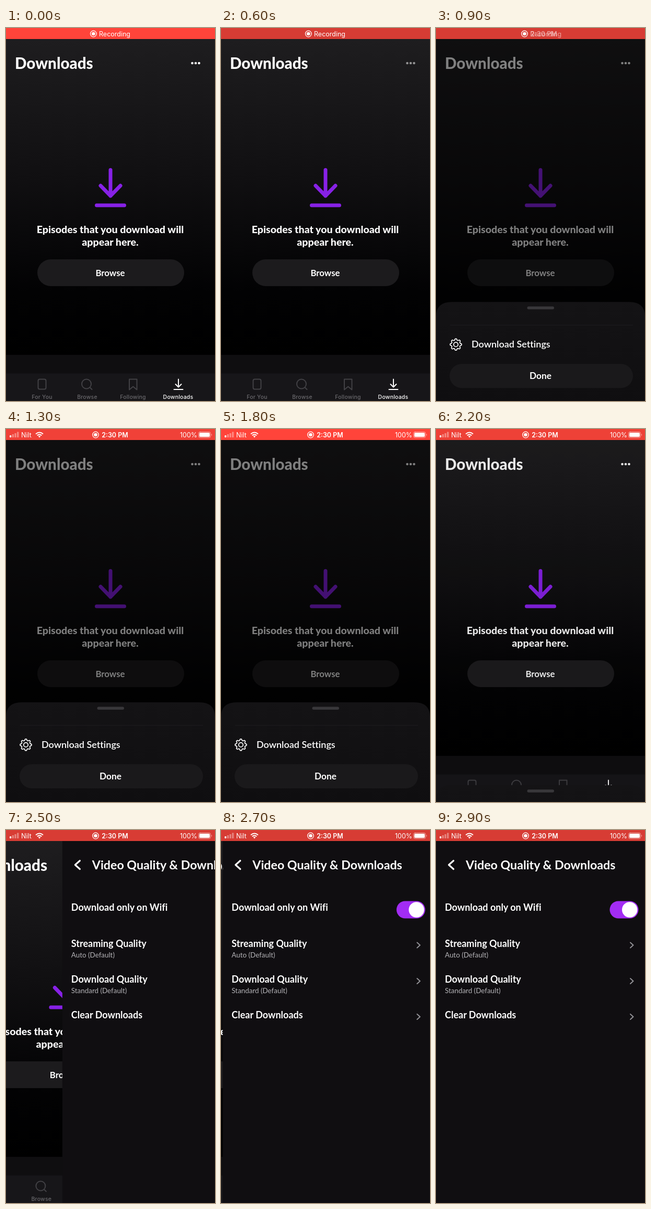
Recreate the animation shown at these times as an HTML page. Size 400 px wide and 711 px high, loop 3 s.

```html
<!DOCTYPE html>
<html lang="en">
<head>
<meta charset="utf-8">
<title>Downloads</title>
<style>
  html, body { margin: 0; width: 100%; height: 100%; overflow: hidden; background: #000; }
  svg { display: block; width: 100vw; height: 100vh; }
  text { font-family: Lato, sans-serif; font-weight: 700; font-variant-ligatures: none; fill: #fff; }
  .mid { text-anchor: middle; }
  .heavy { font-weight: 800; }
  .row { font-size: 18px; }
  .sub { font-size: 13.4px; font-weight: 400; fill: #b5b4b8; }
  .line { fill: none; stroke: #fff; stroke-linecap: round; stroke-linejoin: round; }
  .tabs text { font: 500 10.5px Inter, sans-serif; letter-spacing: .2px; fill: #69686c; }
  .tabs .line { stroke: #424145; stroke-width: 2; }
  .tabs .on text { fill: #fff; }
  .tabs .on .line { stroke: #fff; }
  #status text { font: 400 12.5px Inter, sans-serif; }
  #status .clock { font-weight: 600; }
</style>
</head>
<body>
<svg viewBox="0 0 400 711" preserveAspectRatio="none">
  <defs>
    <linearGradient id="shade" x1="0" y1="0" x2="0" y2="1">
      <stop offset="0" stop-color="#1e1d1f"/>
      <stop offset=".45" stop-color="#100f11"/>
      <stop offset=".8" stop-color="#020203"/>
      <stop offset="1" stop-color="#000"/>
    </linearGradient>
    <linearGradient id="panel" x1="0" y1="0" x2="0" y2="1">
      <stop offset="0" stop-color="#141315"/>
      <stop offset="1" stop-color="#0f0e10"/>
    </linearGradient>
  </defs>

  <g id="home">
    <rect y="21" width="400" height="602" fill="url(#shade)"/>
    <text class="heavy" x="17" y="77.500" font-size="29.600">Downloads</text>
    <g id="dots" fill="#fff">
      <circle cx="356.500" cy="67" r="2.300"/><circle cx="363" cy="67" r="2.300"/><circle cx="369.500" cy="67" r="2.300"/>
    </g>
    <path class="line" style="stroke:#8721e6;stroke-width:7" d="M200 270.500V320M181 300.500l19 19.500 19-19.500M173.500 338h53"/>
    <g class="mid" font-size="19.600">
      <text class="heavy" x="199.500" y="391">Episodes that you download will</text>
      <text class="heavy" x="199.500" y="415">appear here.</text>
    </g>
    <rect x="60" y="441" width="281" height="51" rx="25.500" fill="#1c1b1d"/>
    <text class="mid" x="199.500" y="472.500" font-size="16.800">Browse</text>

    <rect y="623" width="400" height="36" fill="#0f0e10"/>
    <rect y="658.500" width="400" height="53" fill="#171619"/>
    <g class="tabs mid">
      <rect class="line" x="61.500" y="669.500" width="15" height="19" rx="3"/>
      <text x="69" y="707">For You</text>
      <path class="line" d="M145 678.500a9 9 0 1 0 18 0a9 9 0 1 0-18 0M160.500 685l4 4"/>
      <text x="155.500" y="707">Browse</text>
      <path class="line" d="M236 669.500h14.500v20l-7.250-6-7.250 6z"/>
      <text x="243" y="707">Following</text>
      <g class="on">
        <path class="line" d="M330 669.500V684M324.500 679l5.500 5.500 5.500-5.500M321.500 689h17"/>
        <text x="329.500" y="707">Downloads</text>
      </g>
    </g>
  </g>

  <rect id="dim" y="21" width="400" height="690"/>

  <g id="sheet">
    <path d="M0 190V28Q0 0 30 0H370Q400 0 400 28V190z" fill="url(#panel)"/>
    <rect x="174.500" y="8.500" width="51.500" height="5.500" rx="2.750" fill="#38373a"/>
    <path d="M27 44h350" stroke="#1e1d20"/>
    <path id="gear" class="line" stroke-width="1.700"/>
    <circle class="line" cx="38" cy="81" r="4.200" stroke-width="1.700"/>
    <text class="row" x="68" y="87" style="font-weight:600">Download Settings</text>
    <rect x="26" y="118" width="351" height="46" rx="23" fill="#1a191b"/>
    <text class="mid" x="200" y="147" font-size="17.300">Done</text>
  </g>

  <g id="settings">
    <rect y="21" width="400" height="690" fill="#100e11"/>
    <path class="line" stroke-width="3.200" d="M33.500 58.500l-9 8 9 8"/>
    <text x="57" y="75" font-size="23.200">Video Quality &amp; Downloads</text>
    <text class="row" x="17" y="154">Download only on Wifi</text>
    <rect x="332.500" y="135.500" width="55" height="33" rx="16.500" fill="#a22cf3"/>
    <circle cx="370.700" cy="152" r="14.700" fill="#fff"/>
    <text class="row" x="17" y="222.500">Streaming Quality</text>
    <text class="sub" x="17" y="242.500">Auto (Default)</text>
    <text class="row" x="17" y="291">Download Quality</text>
    <text class="sub" x="17" y="311">Standard (Default)</text>
    <text class="row" x="17" y="358.500">Clear Downloads</text>
    <path class="line" style="stroke:#919095;stroke-width:2" d="M372 214.500l5.500 5-5.500 5M372 283l5.500 5-5.500 5M372 351l5.500 5-5.500 5"/>
  </g>

  <g id="status">
    <rect id="bar" width="400" height="21"/>
    <g id="center">
      <circle class="line" cx="167.300" cy="11" r="5.800" stroke-width="1.300"/>
      <circle cx="167.300" cy="11" r="3.300" fill="#fff"/>
      <text id="label" x="178" y="15.500">Recording</text>
      <text id="clock" class="clock mid" x="204.300" y="15.500">2:30 PM</text>
    </g>
    <g id="sides" fill="#fff">
      <rect x="7" y="12" width="3.200" height="4" rx="1"/>
      <path opacity=".38" d="M11.700 10h3.200v6h-3.200zM16.400 8h3.200v8h-3.200zM21.100 5.500h3.200V16h-3.200z"/>
      <text x="29" y="15.500">Nilt</text>
      <path class="line" stroke-width="2" style="stroke-linecap:butt" d="M57 9.500q7-6 14 0M59.700 12.300q4.300-3.600 8.600 0"/>
      <path d="M61.700 13.800q2.300-1.800 4.600 0L64 16.500z"/>
      <text x="333" y="15.500">100%</text>
      <rect class="line" x="368.500" y="5.500" width="23" height="11" rx="3" opacity=".55"/>
      <rect x="370" y="7" width="20" height="8" rx="1.800"/>
      <path d="M393 9q2 2 0 4z" opacity=".6"/>
    </g>
  </g>
</svg>
<script>
const LOOP = 3000, STEP = 100;
const $ = id => document.getElementById(id);
const clamp = v => Math.min(1, Math.max(0, v));
const ramp = (t, from, to) => clamp((t - from) / (to - from));
const easeOut = (u, power) => 1 - (1 - u) ** power;
const shift = (id, x, y = 0) => $(id).setAttribute('transform', `translate(${x} ${y})`);
const fade = (id, alpha) => $(id).setAttribute('opacity', alpha);

// Eight soft teeth around the settings gear
const rim = Array.from({ length: 96 }, (_, i) => {
  const a = i / 96 * 2 * Math.PI;
  const r = 9.7 + 1.3 * Math.tanh(2 * Math.cos(8 * a));
  return `${(38 + r * Math.cos(a)).toFixed(2)} ${(81 + r * Math.sin(a)).toFixed(2)}`;
});
$('gear').setAttribute('d', `M${rim.join('L')}z`);

function draw(t) {
  const open = easeOut(ramp(t, 600, 970), 3) - easeOut(ramp(t, 2000, 2340), 2);
  shift('sheet', 0, 711 - 190 * open);
  fade('dim', 0.5 * open);
  fade('dots', 1 - 0.48 * (ramp(t, 400, 600) - ramp(t, 600, 850)));

  const push = easeOut(ramp(t, 2340, 2792), 3);
  shift('home', -120 * push);
  shift('settings', 400 * (1 - push));

  const glow = clamp(0.52 + 0.65 * Math.cos((t - 1740) / 1950 * 2 * Math.PI));
  $('bar').setAttribute('fill', `rgb(${215 + 40 * glow} ${60 + 8 * glow} ${52 + 6 * glow})`);

  const swap = ramp(t, 800, 1000);
  shift('center', 4.2 * swap);
  fade('label', 1 - swap);
  fade('clock', swap);
  fade('sides', ramp(t, 950, 1150));
}

function tick() {
  draw(Math.floor(performance.now() % LOOP / STEP) * STEP);
  requestAnimationFrame(tick);
}
tick();
</script>
</body>
</html>
```
